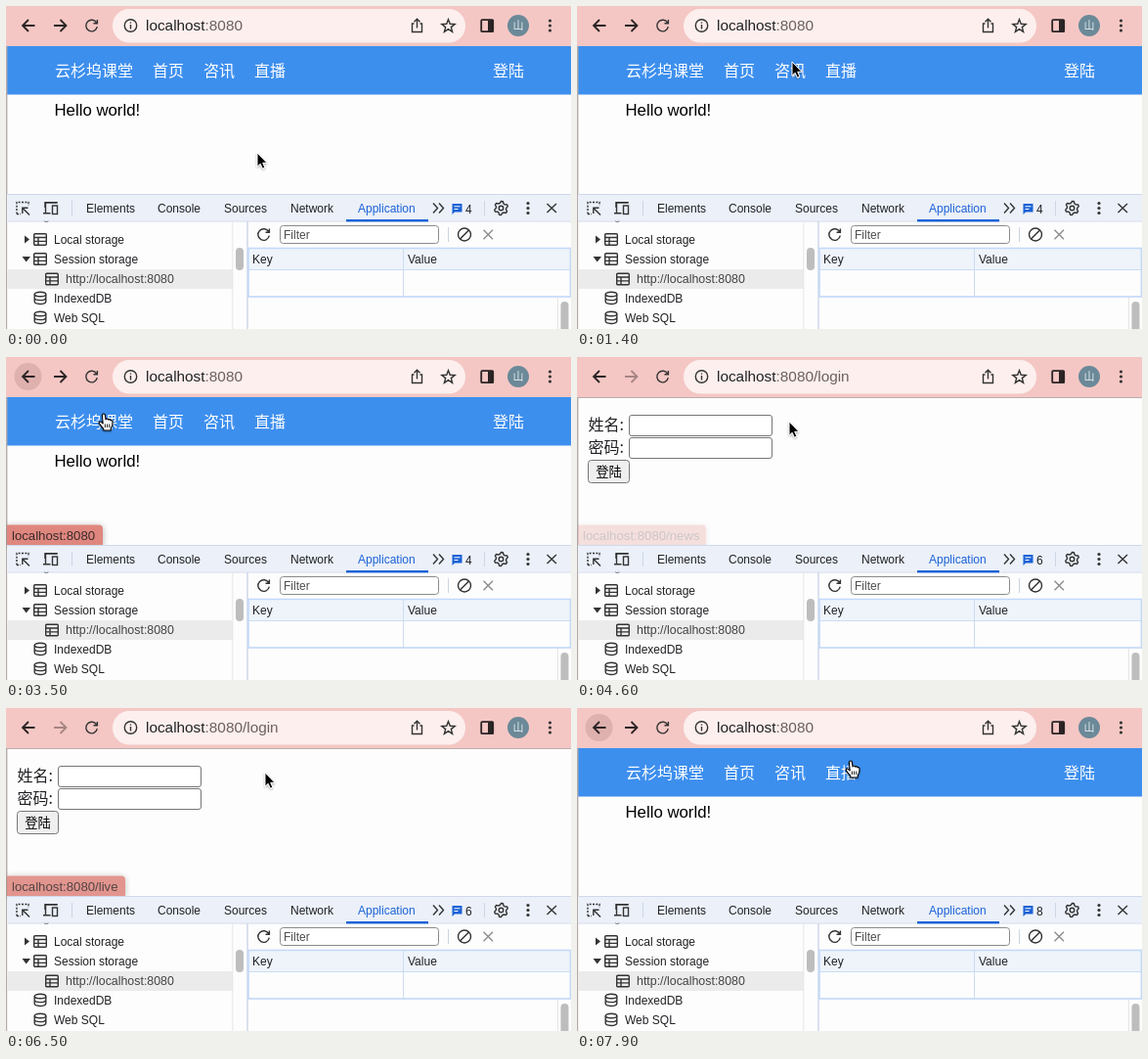
An HTML page that plays this animation: 578x330 px, repeating every 8 s.

```html
<!DOCTYPE html>
<html lang="zh-CN">
<head>
<meta charset="utf-8">
<title>Login redirect</title>
<style>
  html, body { margin: 0; width: 100%; height: 100%; overflow: hidden; background: #fdfdfd; }
  svg { display: block; }
  text { font: 12px "Liberation Sans", "Noto Sans CJK SC", "Noto Sans CJK", sans-serif; fill: #202124; white-space: pre; }
  .cjk { font-family: "Noto Sans CJK SC", "Noto Sans CJK", sans-serif; font-size: 16px; }
  .nav text { fill: #fff; }
  .big { font-size: 16.8px; fill: #000; }
  .url { font-size: 15.35px; }
  .line { fill: none; stroke: #333; stroke-width: 1.4; }
  .bold { stroke-width: 1.8; stroke: #2b2424; }
  .field { fill: #fff; stroke: #767676; }
</style>
</head>
<body>
<svg width="578" height="330" viewBox="0 0 578 330">
  <defs>
    <filter id="soft" x="-20%" y="-60%" width="140%" height="220%">
      <feDropShadow dx="0" dy="1" stdDeviation="3" flood-opacity=".3"/>
    </filter>
    <filter id="lift" x="-50%" y="-50%" width="200%" height="200%">
      <feDropShadow dx="0" dy="1" stdDeviation=".8" flood-opacity=".35"/>
    </filter>
    <g id="grid" class="line" stroke-width="1.3">
      <rect x=".7" y=".7" width="12.6" height="11.6" rx="1"/>
      <path d="M.7 4.5H13.3M.7 8.4H13.3M5 4.5V12.3"/>
    </g>
    <g id="drum" class="line" stroke-width="1.3">
      <ellipse cx="6.5" cy="3" rx="5.8" ry="2.3"/>
      <path d="M.7 3V10.6C.7 13.7 12.3 13.7 12.3 10.6V3M.7 6.8C.7 9.9 12.3 9.9 12.3 6.8"/>
    </g>
    <g id="dots" fill="#333"><circle cy="-5" r="1.6"/><circle r="1.6"/><circle cy="5" r="1.6"/></g>
    <path id="reload" class="line" d="M5.2 -2.8A5.8 5.8 0 1 0 5.8 1.2M5.9 -6V-2.2H2"/>
  </defs>

  <rect width="578" height="330" fill="#fdfdfd"/>

  <g id="home">
    <rect y="41" width="578" height="49.5" fill="#3d8fee"/>
    <g class="nav">
      <text class="cjk" x="50" y="72">云杉坞课堂</text>
      <text class="cjk" x="150" y="72">首页</text>
      <text class="cjk" x="202" y="72">咨讯</text>
      <text class="cjk" x="254" y="72">直播</text>
      <text class="cjk" x="498" y="72">登陆</text>
    </g>
    <text class="big" x="49.5" y="112">Hello world!</text>
  </g>

  <g id="login">
    <rect y="41" width="578" height="1" fill="#b9adad"/>
    <text class="cjk" x="11.5" y="75">姓名:</text>
    <text class="cjk" x="11.5" y="98">密码:</text>
    <rect class="field" x="53.5" y="59.5" width="146" height="21" rx="2.5"/>
    <rect class="field" x="53.5" y="82.5" width="146" height="21" rx="2.5"/>
    <rect x="11.5" y="105.5" width="42" height="23" rx="3" fill="#efefef" stroke="#767676"/>
    <text class="cjk" x="19.3" y="122" style="font-size:13.3px;fill:#000">登陆</text>
  </g>

  <!-- browser toolbar -->
  <rect width="578" height="41" fill="#f4c7c4"/>
  <circle id="hover" cx="22.5" cy="20" r="14" fill="#dfb1ae"/>
  <path class="line bold" d="M29.5 20H17M23 14L17 20L23 26"/>
  <path id="forward" class="line bold" d="M49 20H61.5M55.5 14L61.5 20L55.5 26"/>
  <use href="#reload" x="87.5" y="20"/>
  <rect x="109" y="3" width="361" height="34.5" rx="17.2" fill="#fcefed"/>
  <g class="line" stroke-width="1.3">
    <circle cx="127.5" cy="20" r="6.2"/><path d="M127.5 19V23.4M127.5 16.4V17.8"/>
    <path d="M417.5 18H415.5V26.5H425.5V18H423.5M420.5 22.5V13.5M417.5 16.3L420.5 13.3L423.5 16.3"/>
    <path id="star"/>
  </g>
  <text class="url" x="143" y="25">localhost<tspan fill="#6b5f5f">:8080<tspan id="path"></tspan></tspan></text>
  <rect x="486.2" y="14.2" width="12" height="12" rx="1" class="line bold"/>
  <rect x="493" y="14" width="6" height="12.5" fill="#2b2424"/>
  <circle cx="524" cy="20" r="11" fill="#6b8998"/>
  <text class="cjk" x="524" y="24" text-anchor="middle" style="font-size:11px;fill:#e9eff2">山</text>
  <use href="#dots" x="556.5" y="20"/>
  <rect y="41" width="1.4" height="289" fill="#b5abab"/>

  <g id="status">
    <path id="bubble" fill="#df877f" filter="url(#soft)"/>
    <text id="link" x="6" y="186.5" style="font-size:13.2px;fill:#3a2a2a"></text>
  </g>

  <!-- developer tools -->
  <rect x="1.4" y="192" width="577" height="138" fill="#fdfdfd"/>
  <text x="38" y="218" font-weight="bold">g</text>
  <rect x="1.4" y="192" width="577" height="27.5" fill="#ebf0f9"/>
  <path d="M1.4 192.5H578M1.4 220H578" stroke="#d0d9ea" fill="none"/>
  <g class="line">
    <path d="M11 212.5V200.5H23V204M11 212.5H15" stroke-dasharray="2 1.4"/>
    <path d="M24 213.5L17 206.5M16.8 212V206.3H22.5"/>
    <path d="M40 206V200.7H52.5M38 211.8H45.5"/><rect x="47.5" y="204" width="5" height="8.5"/>
    <path d="M52.6 200.7H40.5V211"/>
    <path d="M437 201.5L441.5 206.5L437 211.5M443 201.5L447.5 206.5L443 211.5"/>
    <path d="M553.5 202L563 211M563 202L553.5 211"/>
    <path d="M46 206V194" stroke="none"/>
  </g>
  <path d="M54.5 198" class="line"/>
  <rect x="67" y="199" width="1" height="15" fill="#cdd6e6"/>
  <g id="tabs"></g>
  <rect x="348" y="218" width="84" height="2.4" fill="#1a62d6"/>
  <path d="M456.5 202H466.5V210.5H459L456.5 213Z" fill="#1a62d6"/>
  <path d="M458.5 204.8H464.5M458.5 207.5H462.5" stroke="#fff" fill="none"/>
  <text id="badge" x="470" y="211.5"></text>
  <rect x="489" y="199" width="1" height="15" fill="#cdd6e6"/>
  <path id="gear" class="line"/>
  <circle class="line" cx="506.5" cy="206.5" r="2.3"/>
  <use href="#dots" x="534" y="206.5"/>

  <!-- storage tree -->
  <rect x="1.4" y="269" width="230.6" height="20" fill="#ebebeb"/>
  <path d="M19 234.5L24 238.5L19 242.5ZM16.5 256H25L20.7 261.5Z" fill="#333"/>
  <use href="#grid" x="28" y="232"/>
  <use href="#grid" x="28" y="252"/>
  <use href="#grid" x="40" y="272.5"/>
  <use href="#drum" x="28.5" y="291.5"/>
  <use href="#drum" x="28.5" y="311.5"/>
  <g id="tree"></g>
  <text x="61" y="283" style="font-size:12.4px;fill:#444">http://localhost:8080</text>
  <path d="M231.8 220V330" stroke="#e6e6e6"/>
  <rect x="235" y="247" width="8" height="23" rx="4" fill="#bdbdbd"/>
  <path d="M247 220V330" stroke="#cbd5e6" stroke-width="1.4"/>

  <!-- storage table -->
  <use href="#reload" x="263.5" y="233.5"/>
  <rect x="280.5" y="224.5" width="162" height="18" rx="3" fill="#fff" stroke="#8a8a8a"/>
  <text x="284" y="238" fill-opacity=".8">Filter</text>
  <path d="M452.5 226V241" stroke="#ccd4e2"/>
  <g class="line"><circle cx="469" cy="233.5" r="6.5"/><path d="M464.5 238L473.5 229"/>
    <path d="M488.5 228.8L498 238.2M498 228.8L488.5 238.2" stroke="#8b8b8b"/></g>
  <rect x="248" y="248" width="330" height="21" fill="#eff4fb"/>
  <path d="M248 269.5H578M406.5 248V297" stroke="#cbdcf3" fill="none"/>
  <rect x="248" y="247.5" width="329.4" height="49.5" fill="none" stroke="#c3d9f8" stroke-width="1.6"/>
  <text x="252" y="263">Key</text>
  <text x="411" y="263">Value</text>
  <path d="M564.5 298V330" stroke="#e6e6e6"/>
  <rect x="567.5" y="302" width="8" height="34" rx="4" fill="#bdbdbd"/>

  <g id="cursor" filter="url(#lift)">
    <path id="arrow" d="M0 0V14.2L3.2 11.3L5.4 16.2L7.9 15.1L5.7 10.3H10Z" fill="#000" stroke="#fff" stroke-width="1"/>
    <g id="hand">
      <path d="M-1.6 1.4C-1.6 -.5 1.2 -.5 1.4 1.4L2 6C2.4 4.6 4.3 4.8 4.5 6.2C5.2 5.3 6.7 5.6 6.9 6.9C7.8 6.3 9 6.9 9 8.2C9.2 11 8.6 13.2 7.2 14.8V17H-.2V15.4C-2 13.6 -3.6 11.4 -4.8 9.6C-5.3 8.2 -3.6 7.4 -2.4 8.6L-.8 10Z" fill="#fff" stroke="#000" stroke-width="1.1" stroke-linejoin="round"/>
      <path d="M1.4 10.5V14M3.6 10.5V14M5.8 10.5V14" stroke="#000" stroke-width=".9"/>
    </g>
  </g>
</svg>
<script>
const LOOP = 8000, STEP = 100;
const $ = id => document.getElementById(id);

const addLabels = (id, rows) => {
  $(id).innerHTML = rows.map(([x, y, label, color = '#202124']) =>
    `<text x="${x}" y="${y}" style="fill:${color}">${label}</text>`).join('');
};
addLabels('tabs', [
  [82, 211, 'Elements'], [155, 211, 'Console'], [223, 211, 'Sources'],
  [291, 211, 'Network'], [360, 211, 'Application', '#1a62d6']
]);
addLabels('tree', [
  [49, 243, 'Local storage'], [49, 263, 'Session storage'],
  [49, 303, 'IndexedDB'], [49, 323, 'Web SQL']
]);

const ring = (n, cx, cy, radius) => 'M' + Array.from({ length: n }, (_, i) => {
  const a = i / n * 2 * Math.PI - Math.PI / 2, r = radius(i);
  return `${(cx + r * Math.cos(a)).toFixed(2)} ${(cy + r * Math.sin(a)).toFixed(2)}`;
}).join('L') + 'Z';
$('star').setAttribute('d', ring(10, 452.5, 20.7, i => i % 2 ? 3 : 7));
$('gear').setAttribute('d', ring(24, 506.5, 206.5, i => i % 4 < 2 ? 7 : 5.2));

// time, x, y of the pointer tip
const moves = [
  [0, 257, 150], [500, 257, 150], [1400, 220, 57], [1700, 217, 64], [2000, 215, 64],
  [2400, 170, 64], [2600, 170, 64], [3100, 30, 26], [3500, 100, 58], [3700, 104, 58],
  [4100, 216, 62], [4400, 217, 66], [4700, 217, 66], [5400, 24, 22], [5700, 23, 21],
  [6200, 265, 62], [6400, 265, 66], [6600, 265, 66], [7000, 24, 22], [7300, 23, 21],
  [7900, 280, 54]
];
const hands = [[1600, 2100], [2300, 2700], [3400, 3800], [4000, 4400], [6100, 6400], [7800, 8000]];
const logins = [[4300, 5600], [6400, 7200]];
const hovers = [[3000, 3700], [5300, 5900], [6900, 8000]];

// shown from, fading from, path, bubble width
const links = [
  [1600, 2100, '/news', 131], [2300, 2700, '/home', 133], [3400, 3700, '', 98],
  [4000, 4300, '/news', 131], [6100, 6450, '/live', 121]
];

const within = (spans, t) => spans.some(([a, b]) => t >= a && t < b);
const show = (id, on) => $(id).setAttribute('visibility', on ? 'visible' : 'hidden');

function pointAt(t) {
  const i = moves.findIndex(m => m[0] > t);
  if (i < 0) return moves[moves.length - 1].slice(1);
  const [t0, x0, y0] = moves[i - 1], [t1, x1, y1] = moves[i];
  const u = (t - t0) / (t1 - t0), e = u * u * (3 - 2 * u);
  return [x0 + (x1 - x0) * e, y0 + (y1 - y0) * e];
}

function drawStatus(t) {
  const link = links.filter(l => l[0] <= t).pop();
  const alpha = link ? Math.max(0, 1 - Math.max(0, t - link[1]) / 400) : 0;
  show('status', alpha > 0);
  if (!alpha) return;
  const [, , path, width] = link;
  $('status').setAttribute('opacity', alpha);
  $('bubble').setAttribute('d', `M1 171.5H${width - 3}Q${width + 1} 171.5 ${width + 1} 175.5V192.5H1Z`);
  $('link').textContent = 'localhost:8080' + path;
}

function draw(t) {
  const login = within(logins, t), hand = within(hands, t);
  show('home', !login);
  show('login', login);
  show('hover', within(hovers, t));
  show('hand', hand);
  show('arrow', !hand);
  $('forward').style.stroke = login ? '#a58583' : '';
  $('path').textContent = login ? '/login' : '';
  $('badge').textContent = t < 4400 ? 4 : t < 6600 ? 6 : 8;
  $('cursor').setAttribute('transform', `translate(${pointAt(t)})`);
  drawStatus(t);
}

const start = performance.now();
function tick() {
  const t = (performance.now() - start) % LOOP;
  draw(Math.floor(t / STEP) * STEP);
  requestAnimationFrame(tick);
}
tick();
</script>
</body>
</html>
```
